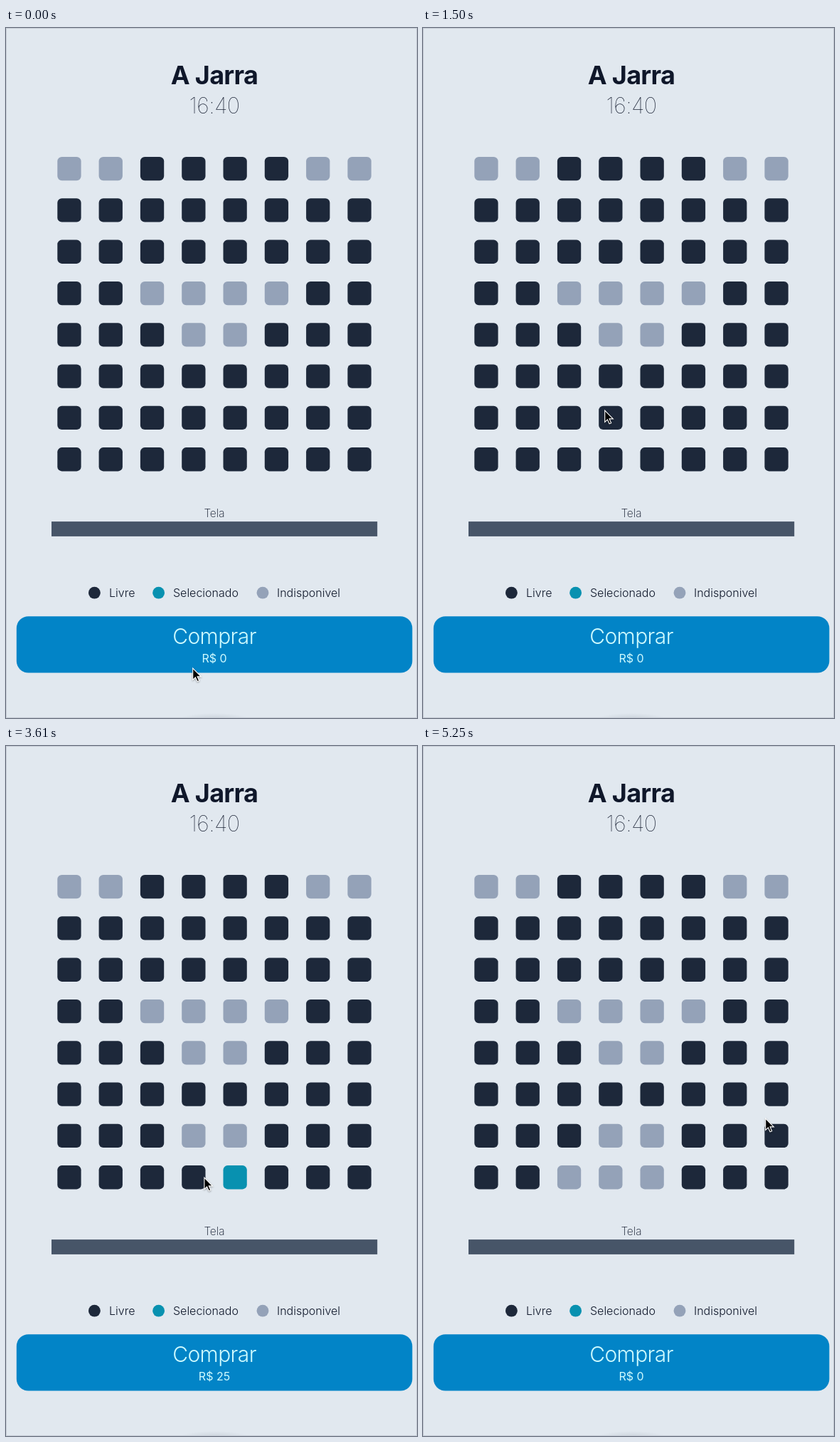
These frames come from a looping animation (578 by 969 pixels, 5.29 s). An HTML page:

```html
<!DOCTYPE html>
<html lang="pt">
<head>
<meta charset="utf-8">
<title>Assentos</title>
<style>
  html, body { margin: 0; width: 100%; height: 100%; overflow: hidden; background: #e1e8ef; }
  svg { display: block; width: 100vw; height: 100vh; font-family: Inter, "Open Sans", sans-serif; }
  .mid { text-anchor: middle; }
  .title { font-size: 36px; font-weight: 700; letter-spacing: -.02em; }
  .time { font-size: 31px; font-weight: 100; letter-spacing: -.02em; }
  .screen { font-size: 15.5px; font-weight: 200; }
  .legend { font-size: 16px; font-weight: 300; }
  .buy { font-size: 30px; font-weight: 300; letter-spacing: -.02em; }
  .price { font-size: 16px; font-weight: 400; }
  .message, .close { font-size: 14.4px; letter-spacing: -.014em; }
  .message { fill: #484848; }
  .close { fill: #0b76d9; font-weight: 500; }
  .close.hover { fill: #075fb8; }
  .free { fill: #1d283a; }
  .picked { fill: #0891b0; }
  .taken { fill: #94a2b8; }
  .card { filter: drop-shadow(0 3px 5px rgba(0, 0, 0, .45)); }
  .cursor { filter: drop-shadow(0 1px 1px rgba(0, 0, 0, .35)); }
</style>
</head>
<body>
<svg viewBox="0 0 578 969" preserveAspectRatio="none">
  <defs>
    <radialGradient id="smudge">
      <stop offset="0" stop-color="#8d97a3" stop-opacity=".25"/>
      <stop offset="1" stop-color="#8d97a3" stop-opacity="0"/>
    </radialGradient>
  </defs>
  <rect width="578" height="969" fill="#e1e8ef"/>
  <ellipse cx="293" cy="970" rx="48" ry="8" fill="url(#smudge)"/>
  <rect x=".5" y=".5" width="577" height="968" fill="none" stroke="#c6ccd6"/>

  <g class="mid" fill="#0f172a">
    <text class="title" x="293" y="78.5">A Jarra</text>
    <text class="time" x="293" y="120">16:40</text>
    <text class="screen" x="293" y="687">Tela</text>
  </g>
  <g id="seats"></g>
  <rect x="64" y="693.1" width="458.2" height="20.8" fill="#475568"/>

  <g class="legend" fill="#0f172a">
    <circle class="free" cx="124.4" cy="793.2" r="8.4"/>
    <text x="145" y="799">Livre</text>
    <circle class="picked" cx="214.6" cy="793.2" r="8.4"/>
    <text x="235" y="799">Selecionado</text>
    <circle class="taken" cx="361" cy="793.2" r="8.4"/>
    <text x="381" y="799">Indisponivel</text>
  </g>

  <rect x="14.8" y="826.2" width="556.6" height="79.4" rx="16.7" fill="#0284c7"/>
  <g class="mid" fill="#cffafe">
    <text class="buy" x="293" y="865">Comprar</text>
    <text class="price" id="price" x="293" y="891">R$ 0</text>
  </g>

  <g id="dialog" visibility="hidden">
    <rect y="2" width="578" height="967" fill="#000" fill-opacity=".4"/>
    <rect class="card" x="64" y="443" width="458.2" height="103" rx="5" fill="#fff"/>
    <path d="M64 505H522" stroke="#d2d2d2" stroke-width="1.2"/>
    <text class="message" id="message" x="89" y="480.5"></text>
    <text class="close" id="close" x="457" y="531.5">Close</text>
  </g>

  <path class="cursor" id="cursor" fill="#000" stroke="#fff" stroke-width="1.1"
    d="M.7 1.2v16.2l3.7-3.5 2.7 5.9 2.6-1.1-2.6-5.8h5.2z"/>
</svg>
<script>
const LOOP = 5290, COLS = 8, PITCH = 58.3, LEFT = 72.3, TOP = 181, SIZE = 33.3;
const $ = id => document.getElementById(id);

// The pointer rests at each stop and clicks as it leaves.
const stop = (arrive, leave, x, y) => ({ arrive, leave, x, y });
const stops = [
  stop(0, 130, 262, 898),
  stop(500, 500, 301, 562),
  stop(720, 720, 101, 488),
  stop(1060, 1130, 467, 526),
  stop(1500, 1690, 255, 536),
  stop(1900, 1980, 318, 546),
  stop(2400, 2480, 296, 860),
  stop(2860, 2950, 477, 526),
  stop(3350, 3430, 318, 605),
  stop(3730, 3730, 257, 605),
  stop(3930, 3960, 205, 606),
  stop(4460, 4560, 266, 866),
  stop(4980, 5060, 481, 522)
];

const ease = u => u * u * (3 - 2 * u);
const mix = (a, b, u) => a + (b - a) * u;

function pointer(t) {
  const next = stops.findIndex(s => s.leave > t);
  if (next < 0) return stops[stops.length - 1];
  const b = stops[next], a = stops[next - 1];
  if (t >= b.arrive) return b;
  const u = ease((t - a.leave) / (b.arrive - a.leave));
  return { x: mix(a.x, b.x, u), y: mix(a.y, b.y, u) };
}

const overClose = ({ x, y }) => x > 450 && x < 502 && y > 514 && y < 540;
const overBuy = ({ y }) => y > 826;
const seatAt = ({ x, y }) =>
  Math.floor((y - TOP) / PITCH) * COLS + Math.floor((x - LEFT) / PITCH);

// Outer seats of the back row and two centred blocks start out sold.
function initialState(i) {
  const row = Math.floor(i / COLS), off = Math.abs(i % COLS - 3.5);
  const sold = row === 0 && off > 2 || row === 3 && off < 2 || row === 4 && off < 1;
  return sold ? "taken" : "free";
}

const seats = Array.from({ length: COLS * COLS }, (_, i) => {
  const seat = document.createElementNS("http://www.w3.org/2000/svg", "rect");
  const attrs = {
    x: LEFT + i % COLS * PITCH, y: TOP + Math.floor(i / COLS) * PITCH,
    width: SIZE, height: SIZE, rx: 6.2
  };
  for (const name in attrs) seat.setAttribute(name, attrs[name]);
  return $("seats").appendChild(seat);
});

// Replays every click made up to time t.
function stateAt(t) {
  let states = seats.map((_, i) => initialState(i)), message = "";
  for (const click of stops.filter(s => s.leave <= t)) {
    if (message) {
      if (!overClose(click)) continue;
      message = "";
      states = states.map(s => s === "picked" ? "taken" : s);
    } else if (overBuy(click)) {
      message = states.includes("picked")
        ? "Compra efetuada com sucesso!"
        : "Selecione 1 ou mais assentos primeiro!";
    } else {
      states[seatAt(click)] = "picked";
    }
  }
  return { states, message };
}

function draw(t) {
  const { states, message } = stateAt(t), at = pointer(t);
  states.forEach((s, i) => seats[i].setAttribute("class", s));
  $("price").textContent = "R$ " + 25 * states.filter(s => s === "picked").length;
  $("dialog").setAttribute("visibility", message ? "visible" : "hidden");
  $("message").textContent = message;
  $("close").classList.toggle("hover", overClose(at));
  $("cursor").setAttribute("transform", `translate(${at.x} ${at.y})`);
}

const start = performance.now();
function tick() {
  draw((performance.now() - start) % LOOP);
  requestAnimationFrame(tick);
}
tick();
</script>
</body>
</html>
```
